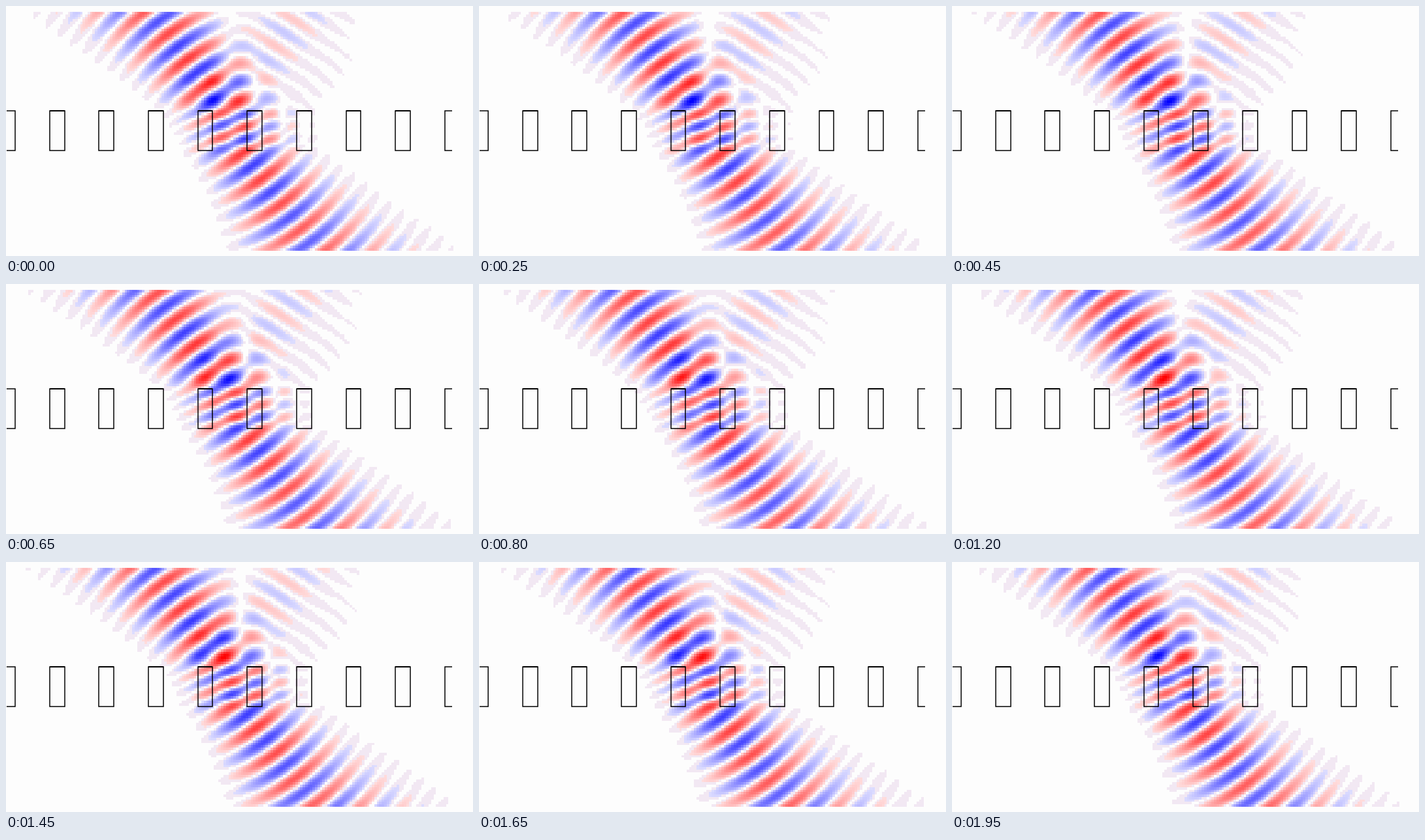
A matplotlib script for the animation above (2000 ms loop, 715 px wide and 384 px high).

```python
import numpy as np
import matplotlib.pyplot as plt
from matplotlib.animation import FuncAnimation

W, H, DPI = 715, 384, 100
FRAMES, INTERVAL = 40, 50

# Grid of square cells
CELL = W / 189
COLS, ROWS = 181, 97
TOP = 8.6

# Gaussian beam crossing a dielectric slab
WAVELENGTH = 48.2
K = 2 * np.pi / WAVELENGTH
INDEX = 1.42
THICK = 16 * CELL
SLAB = TOP + 40.4 * CELL
X0 = 335
ANGLE = np.radians(35.5)
WAIST = 50

BACK = np.array([253, 253, 253]) / 255
FAINT = np.array([242, 232, 243]) / 255


def beam():
    """Complex field as a sum of plane waves with slab reflection."""
    x = (np.arange(COLS) + 0.5) * CELL - X0
    d = TOP + (np.arange(ROWS) + 0.5) * CELL - SLAB
    theta = np.radians(np.linspace(-25, 78, 160))
    weight = np.exp(-((theta - ANGLE) * K * WAIST / 2) ** 2)

    kx = K * np.sin(theta)
    k1 = K * np.cos(theta)
    k2 = np.sqrt((INDEX * K) ** 2 - kx ** 2)
    rho = (k1 - k2) / (k1 + k2)
    trip = np.exp(2j * k2 * THICK)
    den = 1 - rho ** 2 * trip
    refl = rho * (1 - trip) / den
    down = (1 + rho) / den
    up = -down * rho * trip
    trans = down * np.exp(1j * k2 * THICK) * (1 - rho)

    y = d[:, None]
    above = np.exp(1j * k1 * y) + refl * np.exp(-1j * k1 * y)
    inside = down * np.exp(1j * k2 * y) + up * np.exp(-1j * k2 * y)
    below = trans * np.exp(1j * k1 * (y - THICK))
    profile = np.where(y < 0, above, np.where(y < THICK, inside, below))

    u = (profile * weight) @ np.exp(1j * np.outer(kx, x))
    ref = u[int((147 - TOP) / CELL), int(359 / CELL)]
    return u * np.exp(-1j * np.angle(ref)) / np.abs(u).max()


def colour(v):
    """Red for positive, blue for negative, with a pale fringe."""
    a = np.clip(np.abs(v), 0, 1)
    fade = 1 - a
    one = np.ones_like(a)
    rgb = np.stack([np.where(v > 0, one, fade), fade,
                    np.where(v > 0, fade, one)], axis=-1)
    rgb[a < 0.13] = FAINT
    rgb[a < 0.065] = BACK
    return rgb


field = beam()

fig = plt.figure(figsize=(W / DPI, H / DPI), dpi=DPI, facecolor=BACK)
ax = fig.add_axes([0, 0, 1, 1])
ax.axis("off")
image = ax.imshow(colour(field.real), interpolation="nearest", aspect="auto",
                  extent=(0, COLS * CELL, TOP + ROWS * CELL, TOP))
ax.set_xlim(0, W)
ax.set_ylim(H, 0)

# Row of posts, cut off at both ends of the grid
pen = dict(color="black", lw=1.5 * 72 / DPI, solid_joinstyle="miter",
           solid_capstyle="butt")
y1, y2 = SLAB, SLAB + THICK
first, last = 0.5 * CELL - 0.7, (COLS - 0.5) * CELL
for i in range(10):
    left = (20 * i - 2.34) * CELL
    right = left + 6 * CELL
    if left < first:
        xs, ys = [first, right, right, first], [y1, y1, y2, y2]
    elif right > last:
        xs, ys = [last, left, left, last], [y1, y1, y2, y2]
    else:
        xs = [left, right, right, left, left, right]
        ys = [y1, y1, y2, y2, y1, y1]
    ax.plot(xs, ys, **pen)


def update(i):
    turn = np.exp(-2j * np.pi * i / FRAMES)
    image.set_data(colour((field * turn).real))
    return [image]


anim = FuncAnimation(fig, update, frames=FRAMES, interval=INTERVAL,
                     repeat=True, repeat_delay=0)
plt.show()
```
